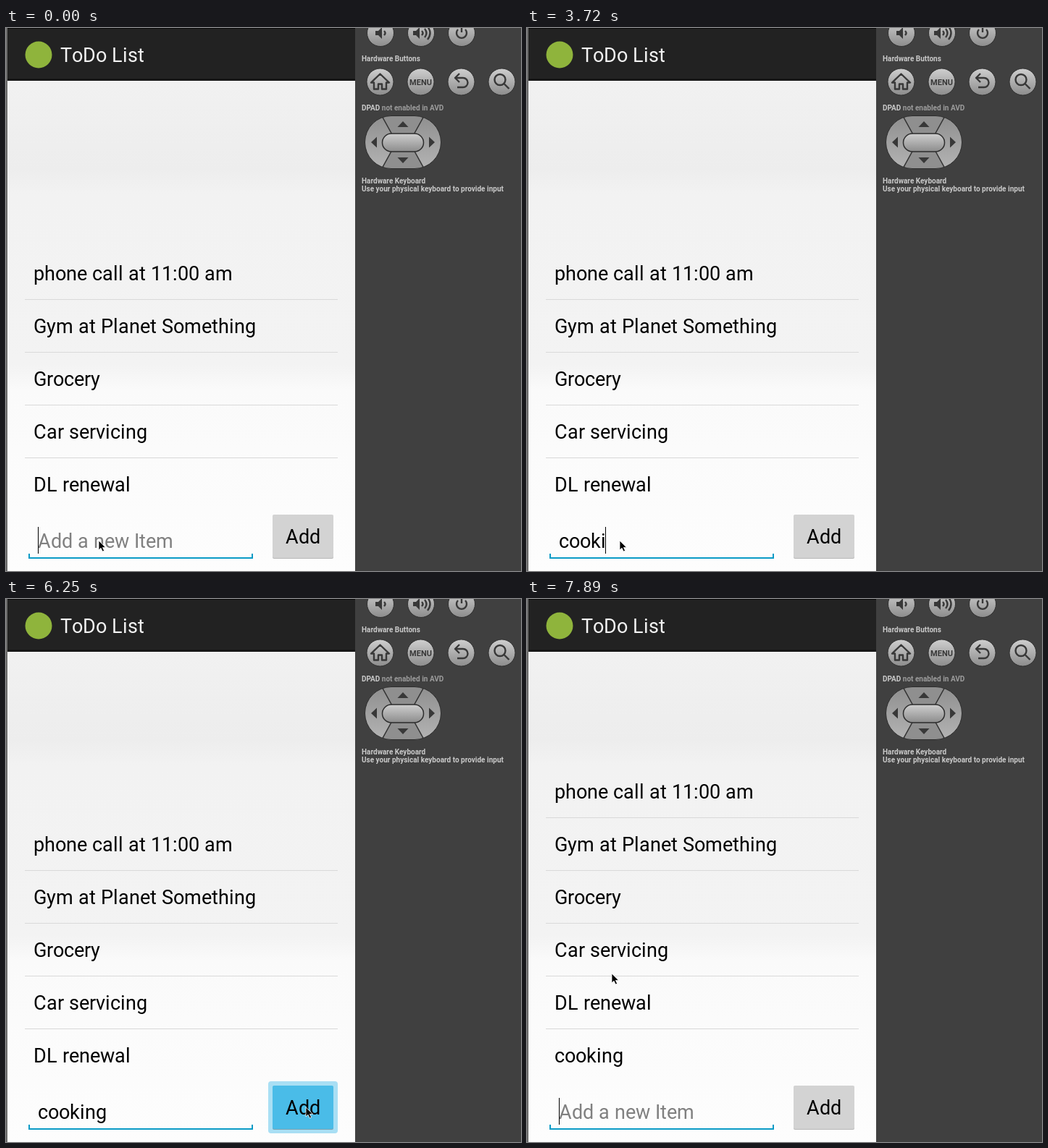
An HTML page for the animation above (8000 ms loop, 711 by 751 pixels).

```html
<!DOCTYPE html>
<html lang="en">
<head>
<meta charset="utf-8">
<title>ToDo List</title>
<style>
  html, body { margin: 0; width: 100%; height: 100%; overflow: hidden; background: #404040; }
  svg { display: block; width: 711px; height: 751px; font: 27px Roboto, sans-serif; font-kerning: none; }
  .rows line { stroke: #d9d9d9; }
  .note { font-size: 10px; font-weight: 700; fill: #c9c9c9; font-kerning: auto; }
  .icon { fill: none; stroke: #383838; stroke-width: 2.4; stroke-linejoin: round; }
  .solid { fill: #383838; }
</style>
</head>
<body>
<svg viewBox="0 0 711 751">
  <defs>
    <linearGradient id="screen" gradientUnits="userSpaceOnUse" x1="0" y1="73" x2="0" y2="751">
      <stop offset="0" stop-color="#f1f1f1"/>
      <stop offset=".18" stop-color="#ededed"/>
      <stop offset=".23" stop-color="#f2f2f2"/>
      <stop offset=".58" stop-color="#f3f3f3"/>
      <stop offset=".63" stop-color="#fafafa"/>
      <stop offset="1" stop-color="#fdfdfd"/>
    </linearGradient>
    <linearGradient id="metal" x2="0" y2="1">
      <stop offset="0" stop-color="#cfcfcf"/>
      <stop offset="1" stop-color="#8c8c8c"/>
    </linearGradient>
    <linearGradient id="pad" x2="0" y2="1">
      <stop offset="0" stop-color="#8f8f8f"/>
      <stop offset="1" stop-color="#b4b4b4"/>
    </linearGradient>
    <clipPath id="padShape"><rect x="495.500" y="121.500" width="105" height="73" rx="36.500"/></clipPath>
  </defs>

  <!-- Phone screen -->
  <rect width="482" height="751" fill="url(#screen)"/>
  <rect width="482" height="73" fill="#222"/>
  <rect width="482" height="1" fill="#080808"/>
  <rect y="70" width="482" height="3" fill="#171717"/>
  <rect width="2" height="751" fill="#6c6c6c"/>
  <circle cx="45" cy="37" r="18.5" fill="#8fb43c"/>
  <text id="title" y="47" fill="#f3f3f3"></text>
  <g class="rows" id="rows"></g>

  <!-- Entry field and button -->
  <path d="M32 727V733H340V727" fill="none" stroke="#0a9bc6" stroke-width="2"/>
  <text id="entry" y="719"></text>
  <rect id="caret" y="690" width="1" height="37"/>
  <rect id="glow" x="362" y="667" width="96" height="72" rx="4" fill="#a9dff4"/>
  <rect x="368" y="674" width="84" height="60" rx="2" fill="#000" opacity=".28"/>
  <rect id="button" x="368" y="673" width="84" height="60" rx="2"/>
  <text id="label" y="713"></text>

  <!-- Hardware panel -->
  <rect x="482" width="229" height="751" fill="#404040"/>
  <g id="keys"></g>
  <path class="solid" d="M510 4h4l5-5v16l-5-5h-4zM562 4h4l5-5v16l-5-5h-4z"/>
  <path class="icon" stroke-width="2" d="M522 4q3 3 0 6M574 4q3 3 0 6M578 1q5 6 0 12M582-2q7 9 0 18M624 2a7 7 0 1 0 10 0M629-2v8"/>
  <path class="icon" d="M504 75.500l12.500-12 12.500 12h-4v9h-6v-7h-5v7h-6v-9z"/>
  <text x="572.500" y="79" text-anchor="middle" font-size="11" font-weight="700" fill="#383838">MENU</text>
  <path class="icon" d="M626 63l-6 6 6 6M620 69h11a6.500 6.500 0 0 1 0 13h-8"/>
  <path class="icon" d="M687.500 77l7 7" stroke-width="3.500"/>
  <circle class="icon" cx="682" cy="71.500" r="7.500"/>
  <g class="note">
    <text x="491" y="46">Hardware Buttons</text>
    <text x="491" y="114">DPAD <tspan fill="#9c9c9c">not enabled in AVD</tspan></text>
    <text x="491" y="215">Hardware Keyboard</text>
    <text x="491" y="226">Use your physical keyboard to provide input</text>
  </g>
  <g clip-path="url(#padShape)">
    <rect x="495" y="121" width="106" height="74" fill="url(#pad)"/>
    <path d="M518 120L534 149H562L578 120zM518 196L534 167H562L578 196z" fill="#8f8f8f" stroke="#333" stroke-width="1.500"/>
  </g>
  <rect x="495.500" y="121.500" width="105" height="73" rx="36.500" fill="none" stroke="#2d2d2d"/>
  <rect x="519.500" y="146" width="57" height="25" rx="12.500" fill="url(#metal)" stroke="#2d2d2d" stroke-width="1.500"/>
  <path class="solid" d="M540.500 137l7.500-8 7.500 8zM540.500 179l7.500 8 7.500-8zM512 150.500l-8 7.500 8 7.500zM584 150.500l8 7.500-8 7.500z"/>

  <path id="pointer" d="M0 0V13L3 10.200L5.300 15L7.600 14L5.400 9.400H9.500z" stroke="#fff" stroke-width=".8"/>
</svg>
<script>
const LOOP = 8000;
const HINT = 'Add a new Item';
const ITEMS = ['phone call at 11:00 am', 'Gym at Planet Something', 'Grocery', 'Car servicing', 'DL renewal'];
const $ = id => document.getElementById(id);

// Each step changes part of the state at its time in ms.
const STEPS = [
  [0, { text: '', caret: true, pointer: [128, 709], pressed: false, items: ITEMS }],
  [300, { caret: false }],
  [740, { caret: true }],
  [1340, { text: 'c' }],
  [2090, { text: 'co' }],
  [2240, { text: 'coo' }],
  [2530, { text: 'cook' }],
  [2680, { text: 'cooki' }],
  [3130, { text: 'cookig' }],
  [3570, { caret: false }],
  [3720, { text: 'cooki', caret: true }],
  [4170, { caret: false }],
  [4460, { text: 'cookin', caret: true }],
  [4610, { text: 'cooking' }],
  [5210, { caret: false }],
  [5500, { pointer: [168, 715] }],
  [5650, { pointer: [290, 719] }],
  [5800, { pointer: [388, 711], caret: true }],
  [5950, { pointer: [414, 703] }],
  [6250, { pressed: true, caret: false }],
  [6400, { pressed: false, caret: true, text: '', items: [...ITEMS, 'cooking'] }],
  [7000, { pointer: [432, 680], caret: false }],
  [7150, { pointer: [482, 605] }],
  [7300, { pointer: [412, 515] }],
  [7440, { pointer: [334, 449], caret: true }],
  [7590, { pointer: [411, 507] }],
  [7890, { pointer: [117, 518] }]
];

$('keys').innerHTML = [[517, 7], [573, 7], [629, 7], [516.5, 74.5], [572.5, 74.5], [628.5, 74.5], [684.5, 74.5]]
  .map(([x, y]) => `<circle cx="${x}" cy="${y}" r="18.5" fill="url(#metal)" stroke="#303030"/>`)
  .join('');

const ruler = document.createElement('canvas').getContext('2d');
ruler.font = '27px Roboto, sans-serif';

// Sets text on whole-pixel advances, as the phone does, and returns where it ends.
function setText(node, text, x) {
  const starts = [];
  for (const char of text) {
    starts.push(x);
    x += Math.round(ruler.measureText(char).width);
  }
  node.textContent = text;
  node.setAttribute('x', starts.join(' '));
  return x;
}

function drawRows(items) {
  const baseline = i => 641 - 73 * (items.length - 1 - i);
  $('rows').innerHTML = items.map((item, i) => {
    const y = baseline(i);
    const divider = i < items.length - 1 ? `<line x1="26" x2="458" y1="${y + 26.5}" y2="${y + 26.5}"/>` : '';
    return `<text y="${y}"></text>${divider}`;
  }).join('');
  $('rows').querySelectorAll('text').forEach((node, i) => setText(node, items[i], 38));
}

function draw({ text, caret, pointer, pressed, items }) {
  drawRows(items);
  const end = setText($('entry'), text || HINT, 44);
  $('entry').setAttribute('fill', text ? '#000' : '#808080');
  $('caret').setAttribute('x', text ? end - 1 : 44);
  $('caret').style.display = caret ? '' : 'none';
  $('glow').style.display = pressed ? '' : 'none';
  $('button').setAttribute('fill', pressed ? '#4abce8' : '#d3d3d3');
  $('pointer').setAttribute('transform', `translate(${pointer})`);
}

setText($('title'), 'ToDo List', 75);
setText($('label'), 'Add', 386);

let shown = -1;
function tick() {
  const time = performance.now() % LOOP;
  const past = STEPS.filter(([start]) => start <= time);
  if (past.length !== shown) {
    shown = past.length;
    draw(Object.assign({}, ...past.map(([, change]) => change)));
  }
  requestAnimationFrame(tick);
}
tick();
</script>
</body>
</html>
```
